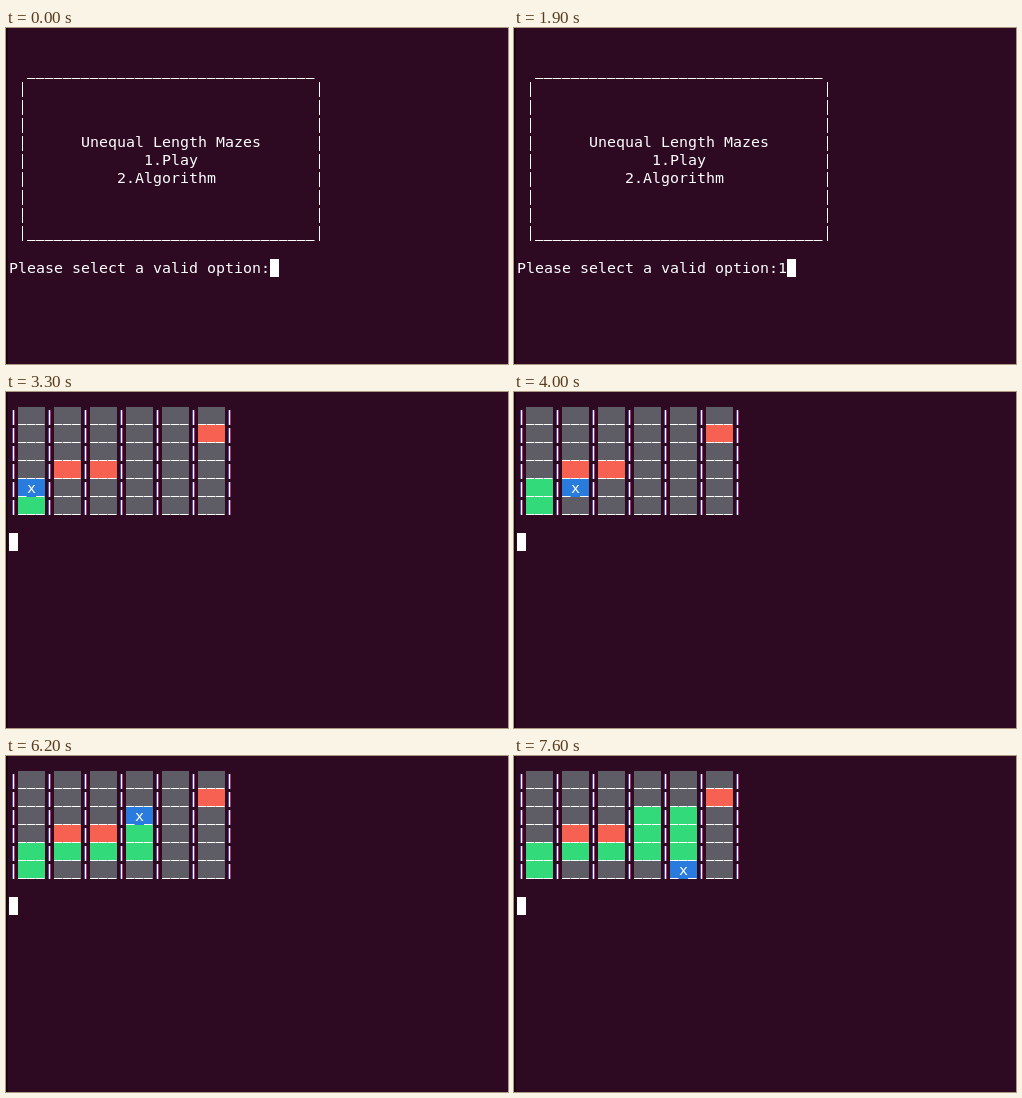
Animation, 502 px wide and 336 px high, one loop 8000 ms. Source, as an HTML page:

```html
<!DOCTYPE html>
<html lang="en">
<head>
<meta charset="utf-8">
<title>Maze in a terminal</title>
<style>
html, body { margin: 0; width: 100%; height: 100%; overflow: hidden; background: #2d0922; }
svg { display: block; }
text { font: 14.95px "DejaVu Sans Mono", monospace; fill: #fff; white-space: pre; }
</style>
</head>
<body>
<svg id="stage" width="502" height="336" viewBox="0 0 502 336">
  <rect width="502" height="336" fill="#2d0922"/>
  <rect width="2" height="336" fill="#190611"/>
  <g id="menu"></g>
  <g id="maze"></g>
  <rect id="cursor" width="9" height="18" fill="#fff"/>
</svg>
<script>
const LOOP = 8000, CW = 9, CH = 18;
const COLOR = { wall: '#f66151', trail: '#33da7a', player: '#2a7bde', open: '#5e5c64' };
const SIZE = 6;
const walls = ['5,1', '1,3', '2,3'];

// Player position [time, column, row]
const steps = [
  [2300, 0, 5], [3300, 0, 4], [4000, 1, 4], [4400, 2, 4], [4700, 3, 4], [5300, 3, 3],
  [6200, 3, 2], [6400, 4, 2], [7100, 4, 3], [7300, 4, 4], [7600, 4, 5]
];
// Cursor hidden [from, to]
const hidden = [[300, 900], [1500, 1900], [2800, 3200], [3800, 3900], [5800, 6000], [6900, 7000]];

const $ = id => document.getElementById(id);
const px = col => 3 + col * CW;
const py = row => 15 + row * CH;

function add(parent, tag, attrs) {
  const el = document.createElementNS('http://www.w3.org/2000/svg', tag);
  for (const k in attrs) el.setAttribute(k, attrs[k]);
  return parent.appendChild(el);
}

// One x per character keeps the text on the terminal grid
function write(parent, col, row, str) {
  const x = [...str].map((_, i) => px(col + i)).join(' ');
  const el = add(parent, 'text', { x, y: py(row) + 14 });
  el.textContent = str;
  return el;
}

function underline(parent, col, row, count) {
  return add(parent, 'path', {
    d: `M${px(col)} ${py(row) + 17.5}h${count * CW}`,
    stroke: '#fff', 'stroke-dasharray': '8.5 .5'
  });
}

function bar(parent, col, row, fringe) {
  const x = px(col) + 4, y = py(row) + 3;
  const line = (dx, fill) => add(parent, 'rect', { x: x + dx, y, width: 1, height: 15, fill });
  if (fringe) {
    line(-1, '#4a4cc0');
    line(1, '#a83a58');
  }
  line(0, '#fff');
}

const menu = $('menu'), maze = $('maze'), cursor = $('cursor');

underline(menu, 2, 1, 32);
underline(menu, 2, 10, 32);
for (let r = 2; r <= 10; r++) {
  bar(menu, 1, r);
  bar(menu, 34, r);
}
write(menu, 8, 5, 'Unequal Length Mazes');
write(menu, 15, 6, '1.Play');
write(menu, 12, 7, '2.Algorithm');
write(menu, 0, 12, 'Please select a valid option:');
const answer = write(menu, 29, 12, '1');

const cells = {};
for (let r = 0; r < SIZE; r++) {
  for (let c = 0; c <= SIZE; c++) {
    bar(maze, c * 4, r, true);
    if (c === SIZE) continue;
    const col = c * 4 + 1;
    const box = add(maze, 'rect', { x: px(col), y: py(r), width: 3 * CW, height: CH });
    underline(maze, col, r, 1);
    const mid = underline(maze, col + 1, r, 1);
    underline(maze, col + 2, r, 1);
    cells[c + ',' + r] = { box, mid };
  }
}
const mark = write(maze, 0, 0, 'x');

const show = (el, on) => el.setAttribute('visibility', on ? 'visible' : 'hidden');

function drawMaze(t) {
  const path = steps.filter(s => s[0] <= t).map(s => s[1] + ',' + s[2]);
  const here = path[path.length - 1];
  for (const key in cells) {
    const kind = key === here ? 'player'
      : path.includes(key) ? 'trail'
      : walls.includes(key) ? 'wall' : 'open';
    cells[key].box.setAttribute('fill', COLOR[kind]);
    cells[key].mid.setAttribute('stroke', kind === 'player' ? 'none' : '#fff');
  }
  const [c, r] = here.split(',').map(Number);
  mark.setAttribute('x', px(c * 4 + 2));
  mark.setAttribute('y', py(r) + 14);
}

function render(t) {
  const playing = t >= steps[0][0], typed = t >= 1900;
  menu.setAttribute('display', playing ? 'none' : 'inline');
  maze.setAttribute('display', playing ? 'inline' : 'none');
  show(answer, typed);
  if (playing) drawMaze(t);
  cursor.setAttribute('x', px(playing ? 0 : typed ? 30 : 29));
  cursor.setAttribute('y', py(playing ? 7 : 12));
  show(cursor, !hidden.some(([a, b]) => t >= a && t < b));
}

const start = performance.now();
function tick() {
  render((performance.now() - start) % LOOP);
  requestAnimationFrame(tick);
}
tick();
</script>
</body>
</html>
```
